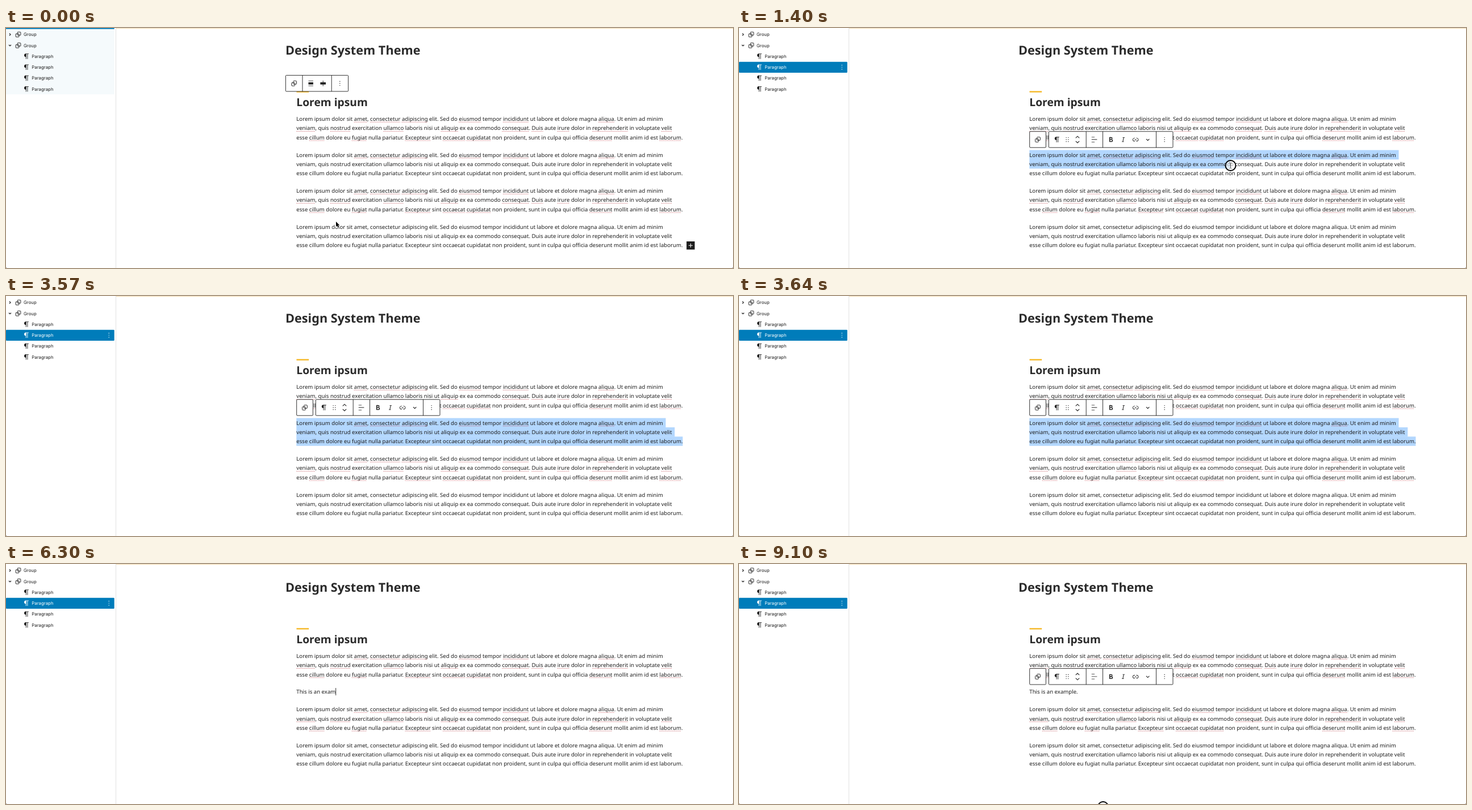
An HTML page with a canvas for the animation above (9170 ms loop, 1280 by 424 pixels).

```html
<!DOCTYPE html>
<html lang="en">
<head>
<meta charset="utf-8">
<title>Block editor</title>
<style>
html, body { margin: 0; width: 100%; height: 100%; overflow: hidden; background: #fff; }
canvas { display: block; width: 1280px; height: 424px; }
</style>
</head>
<body>
<canvas id="stage"></canvas>
<script>
const W = 1280, H = 424, LOOP = 9170, STEP = 70;
const INK = '#1e1e1e', BLUE = '#007cba', UI = 0.6017;
const font = (px, weight = 'normal', family = 'Noto Sans') =>
  `${weight} ${px * UI}px "${family}", sans-serif`;
const BODY = font(16);
const LINE = 27.2 * UI, GAP = 24 * UI, ASCENT = 19.8 * UI;
const LEFT = 511.3, TITLE_LEFT = 492;

const canvas = document.getElementById('stage');
const ctx = canvas.getContext('2d');
const dpr = window.devicePixelRatio || 1;
canvas.width = W * dpr;
canvas.height = H * dpr;

const LINES = [
  'Lorem ipsum dolor sit amet, consectetur adipiscing elit. Sed do eiusmod tempor incididunt ut labore et dolore magna aliqua. Ut enim ad minim',
  'veniam, quis nostrud exercitation ullamco laboris nisi ut aliquip ex ea commodo consequat. Duis aute irure dolor in reprehenderit in voluptate velit',
  'esse cillum dolore eu fugiat nulla pariatur. Excepteur sint occaecat cupidatat non proident, sunt in culpa qui officia deserunt mollit anim id est laborum.'
];
const MISSPELLED = [
  'amet consectetur adipiscing eiusmod incididunt aliqua',
  'veniam nostrud ullamco aliquip consequat Duis irure reprehenderit velit',
  'cillum fugiat Excepteur occaecat cupidatat deserunt laborum'
].map(s => s.split(' '));

const TYPED = 'This is an example.';
const KEY_TIMES = [3780, 3920, 4060, 4200, 4480, 4620, 4760, 4900, 5040, 5180,
  5320, 5460, 5670, 6090, 6230, 6370, 6510, 6580, 7140];

// Pointer paths: [time, x, y]; each path is visible until its last time.
const PATHS = [
  [[0, 581, 342], [490, 535, 262], [840, 511, 223], [1050, 511, 223], [1400, 865.5, 243],
    [1750, 1040, 250], [2100, 1158, 252], [2170, 1162.7, 252], [2380, 1194, 255],
    [2520, 1194, 255], [3080, 562, 136], [3569, 562, 136]],
  [[7770, 1042, 312], [8260, 566, 300], [8540, 572, 345], [8750, 606, 430]],
  [[9100, 641, 429], [9170, 641, 429]]
];
const SELECT_FROM = 980, RELEASE = 2450, CLICK_AWAY = 9100;

const ICONS = {
  paragraph: 'M18.3 4H9.9v-.1l-.9.2c-2.3.4-4 2.4-4 4.8s1.7 4.4 4 4.8l.7.1V20h1.5V5.5h2.9V20h1.5V5.5h2.7V4z',
  stretch: 'M5 15h14V9H5zM5 19.8h14v-1.5H5zM5 4.2v1.5h14V4.2z',
  middle: 'M20 9h-7.2V4h-1.6v5H4v6h7.2v5h1.6v-5H20z',
  left: 'M4 19.8h8.9v-1.5H4zM4 4.2v1.5h8.9V4.2zM4 11.2v1.5h16v-1.5z',
  bold: 'M14.7 11.3c1-.6 1.5-1.6 1.5-3 0-2.3-1.3-3.4-4-3.4H7v14h5.8c1.4 0 2.5-.3 3.3-1 .8-.7 1.2-1.7 1.2-2.9.1-1.9-.8-3.1-2.6-3.7zm-5.1-4h2.3c.6 0 1.1.1 1.4.4.3.3.5.7.5 1.2s-.2 1-.5 1.2c-.3.3-.8.4-1.4.4H9.6V7.3zm4.6 9c-.4.3-1 .4-1.7.4H9.6v-3.9h2.9c.7 0 1.3.2 1.7.5.4.3.6.8.6 1.5s-.2 1.2-.6 1.5z',
  italic: 'M10.4 5h6.2v1.4h-2.3l-2.3 11.2h2.2V19H8v-1.4h2.3l2.3-11.2h-2.2z',
  link: 'M15.6 7.2H14v1.5h1.6c2 0 3.7 1.7 3.7 3.7s-1.7 3.7-3.7 3.7H14v1.5h1.6c2.8 0 5.2-2.3 5.2-5.2 0-2.9-2.3-5.2-5.2-5.2zM4.7 12.4c0-2 1.7-3.7 3.7-3.7H10V7.2H8.4c-2.9 0-5.2 2.3-5.2 5.2 0 2.9 2.3 5.2 5.2 5.2H10v-1.5H8.4c-2 0-3.7-1.7-3.7-3.7zm4.6.9h5.3v-1.5H9.3v1.5z',
  dots: 'M13 19h-2v-2h2zM13 13h-2v-2h2zM13 7h-2V5h2z',
  drag: 'M8 7h2V5H8zM8 13h2v-2H8zM8 19h2v-2H8zM14 5v2h2V5zM14 13h2v-2h-2zM14 19h2v-2h-2z'
};
for (const name in ICONS) ICONS[name] = new Path2D(ICONS[name]);

function rect(x, y, w, h, color) {
  ctx.fillStyle = color;
  ctx.fillRect(x, y, w, h);
}

function text(str, x, y, face, color = INK) {
  ctx.font = face;
  ctx.fillStyle = color;
  ctx.fillText(str, x, y);
}

function icon(name, cx, cy, color = INK) {
  ctx.save();
  ctx.translate(cx, cy);
  ctx.scale(UI, UI);
  ctx.translate(-12, -12);
  ctx.fillStyle = color;
  ctx.fill(ICONS[name]);
  ctx.restore();
}

function groupIcon(cx, cy) {
  ctx.strokeStyle = INK;
  ctx.lineWidth = 0.95;
  ctx.beginPath();
  ctx.roundRect(cx - 4.35, cy - 1.35, 5.7, 5.7, 0.8);
  ctx.roundRect(cx - 1.35, cy - 4.35, 5.7, 5.7, 0.8);
  ctx.stroke();
}

function chevron(cx, cy, size, angle) {
  ctx.save();
  ctx.translate(cx, cy);
  ctx.rotate(angle);
  ctx.strokeStyle = INK;
  ctx.lineWidth = 1.1;
  ctx.beginPath();
  ctx.moveTo(-size, -size / 2);
  ctx.lineTo(0, size / 2);
  ctx.lineTo(size, -size / 2);
  ctx.stroke();
  ctx.restore();
}

function panel(x, y, w, dividers = []) {
  ctx.beginPath();
  ctx.roundRect(x, y, w, 28.4, 1.2);
  ctx.fillStyle = '#fff';
  ctx.fill();
  ctx.strokeStyle = INK;
  ctx.lineWidth = 0.9;
  ctx.stroke();
  for (const d of dividers) rect(d - 0.45, y, 0.9, 28.4, INK);
}

function groupToolbar() {
  panel(492.4, 83.6, 110.2, [522, 573.2]);
  groupIcon(507.2, 97.9);
  icon('stretch', 536.7, 97.9);
  icon('middle', 558.2, 97.9);
  icon('dots', 587.8, 97.9);
}

function paragraphToolbar(shift) {
  const y = 182.8 + shift, cy = y + 14.3;
  panel(511.7, y, 28.7);
  groupIcon(526, cy);
  panel(545.3, y, 218.7, [611.2, 640.6, 734.6]);
  icon('paragraph', 560, cy);
  icon('drag', 578, cy);
  chevron(596, cy - 4.3, 3.2, Math.PI);
  chevron(596, cy + 4.3, 3.2, 0);
  icon('left', 625.6, cy);
  icon('bold', 655, cy);
  icon('italic', 676.4, cy);
  icon('link', 698.2, cy);
  chevron(719.7, cy + 0.3, 2.7, 0);
  icon('dots', 749.2, cy);
}

function sidebar(selected) {
  if (!selected) {
    rect(0, 0, 190.7, 117.2, '#f5fafc');
    rect(0, 0, 190.7, 1.8, BLUE);
  }
  const face = font(13, 'normal', 'Inter');
  const row = 32 * UI;
  for (let i = 0; i < 6; i++) {
    const cy = 11.5 + row * i;
    const active = selected && i === 3;
    const color = active ? '#fff' : INK;
    if (active) {
      ctx.fillStyle = BLUE;
      ctx.beginPath();
      ctx.roundRect(0, cy - row / 2, 190.7, row, 1.2);
      ctx.fill();
    }
    if (i < 2) {
      chevron(7, cy, 2, i ? 0 : -Math.PI / 2);
      groupIcon(21.5, cy);
      text('Group', 31, cy + 2.8, face);
    } else {
      icon('paragraph', 36.2, cy, color);
      text('Paragraph', 45.3, cy + 2.8, face, color);
    }
    if (active) icon('dots', 181.2, cy, color);
  }
  rect(193, 0, 1, H, '#e2e2e2');
}

function spelling(row, base) {
  ctx.strokeStyle = 'rgba(180, 45, 55, 0.8)';
  ctx.lineWidth = 0.9;
  ctx.setLineDash([1.2, 1.2]);
  for (const word of MISSPELLED[row]) {
    const at = LINES[row].indexOf(word);
    const x = LEFT + ctx.measureText(LINES[row].slice(0, at)).width;
    ctx.beginPath();
    ctx.moveTo(x, base + 2.2);
    ctx.lineTo(x + ctx.measureText(word).width, base + 2.2);
    ctx.stroke();
  }
  ctx.setLineDash([]);
}

function paragraph(top, checkedRows) {
  LINES.forEach((line, i) => {
    const base = top + ASCENT + LINE * i;
    text(line, LEFT, base, BODY);
    if (i < checkedRows) spelling(i, base);
  });
}

// Width of the line up to the letter edge nearest to x.
function snap(line, x) {
  let best = 0;
  for (let i = 1; i <= line.length; i++) {
    const w = ctx.measureText(line.slice(0, i)).width;
    if (Math.abs(w - x + LEFT) < Math.abs(best - x + LEFT)) best = w;
  }
  return best;
}

function selection(top, x, y) {
  ctx.font = BODY;
  const last = Math.max(0, Math.min(2, Math.floor((y - top) / LINE)));
  for (let i = 0; i <= last; i++) {
    const w = i < last ? ctx.measureText(LINES[i]).width + 4.8 : snap(LINES[i], x);
    rect(LEFT, top + LINE * i, w, LINE + (i < last ? 0.3 : 0), '#b3d7fe');
  }
}

function pointerAt(t) {
  const path = PATHS.find(p => t >= p[0][0] && t <= p[p.length - 1][0]);
  if (!path) return null;
  const i = Math.max(1, path.findIndex(k => k[0] >= t));
  const [t0, x0, y0] = path[i - 1], [t1, x1, y1] = path[i];
  const k = (t - t0) / (t1 - t0);
  return { x: x0 + (x1 - x0) * k, y: y0 + (y1 - y0) * k };
}

function arrow(x, y) {
  ctx.beginPath();
  [[0, 0], [0, 9], [2, 7.2], [3.5, 10.4], [5.1, 9.7], [3.7, 6.6], [6.4, 6.4]]
    .forEach(([dx, dy]) => ctx.lineTo(x + dx, y + dy));
  ctx.closePath();
  ctx.strokeStyle = '#fff';
  ctx.lineWidth = 1.4;
  ctx.stroke();
  ctx.fillStyle = '#000';
  ctx.fill();
}

function beam(x, y) {
  ctx.strokeStyle = '#555';
  ctx.lineWidth = 0.9;
  ctx.beginPath();
  for (const side of [-2, 2]) {
    ctx.moveTo(x + side, y - 5);
    ctx.quadraticCurveTo(x, y - 5, x, y - 3.5);
    ctx.lineTo(x, y + 3.5);
    ctx.quadraticCurveTo(x, y + 5, x + side, y + 5);
  }
  ctx.stroke();
}

function pressRing(x, y) {
  ctx.beginPath();
  ctx.arc(x, y, 9, 0, Math.PI * 2);
  ctx.fillStyle = 'rgba(255, 255, 255, 0.6)';
  ctx.fill();
  ctx.strokeStyle = '#000';
  ctx.lineWidth = 1.9;
  ctx.stroke();
}

function pointer(t, p) {
  const pressed = (t >= SELECT_FROM && t < RELEASE) || t >= CLICK_AWAY;
  if (pressed) pressRing(p.x, p.y);
  if (t < 560 || t >= 8400) arrow(p.x, p.y);
  else beam(p.x, p.y);
}

function caretVisible(t, lastKey) {
  return t < CLICK_AWAY && (t - lastKey) % 1000 < 530;
}

function typedLine(t, count, top) {
  const str = TYPED.slice(0, count);
  text(str, LEFT, top + ASCENT, BODY);
  if (caretVisible(t, KEY_TIMES[count - 1])) {
    rect(LEFT + ctx.measureText(str).width, top + 1.6, 0.9, 13, INK);
  }
}

function draw(t) {
  const count = KEY_TIMES.filter(k => t >= k).length;
  const shift = count ? 1.8 : 0;
  const selected = t >= SELECT_FROM;
  const p = pointerAt(t);

  ctx.setTransform(dpr, 0, 0, dpr, 0, 0);
  ctx.textRendering = 'geometricPrecision';
  rect(0, 0, W, H, '#fff');
  sidebar(selected);
  rect(194, 0, W - 194, 1.2, '#f6e0b8');

  text('Design System Theme', TITLE_LEFT, 47.3 + shift, font(36, 'bold'), '#2b2b2b');
  rect(511.5, 111.4 + shift, 21.7, 2.4, '#f5b827');
  text('Lorem ipsum', LEFT, 137.8 + shift, font(32, 'bold'), '#2b2b2b');

  const block = 3 * LINE + GAP;
  let top = 152.1 + shift;
  paragraph(top, 3);
  top += block;
  if (count) {
    typedLine(t, count, top);
    top += LINE + GAP;
  } else {
    if (selected) {
      const end = t < RELEASE ? p : { x: 1200, y: 256 };
      selection(top, end.x, end.y);
    }
    paragraph(top, 1);
    top += block;
  }
  paragraph(top, 3);
  paragraph(top + block, 0);

  if (!selected) {
    groupToolbar();
    rect(1198.2, 377, 14.4, 14.4, INK);
    rect(1201.8, 383.7, 7.2, 1, '#fff');
    rect(1204.9, 380.6, 1, 7.2, '#fff');
  } else if (!count || t >= 7770) {
    paragraphToolbar(shift);
  }
  if (p) pointer(t, p);

  rect(0, H - 1, 1, 1, '#777');
  rect(W - 1, H - 1, 1, 1, '#777');
}

const start = performance.now();
function tick() {
  const t = (performance.now() - start) % LOOP;
  draw(Math.floor(t / STEP) * STEP);
  requestAnimationFrame(tick);
}
tick();
</script>
</body>
</html>
```
